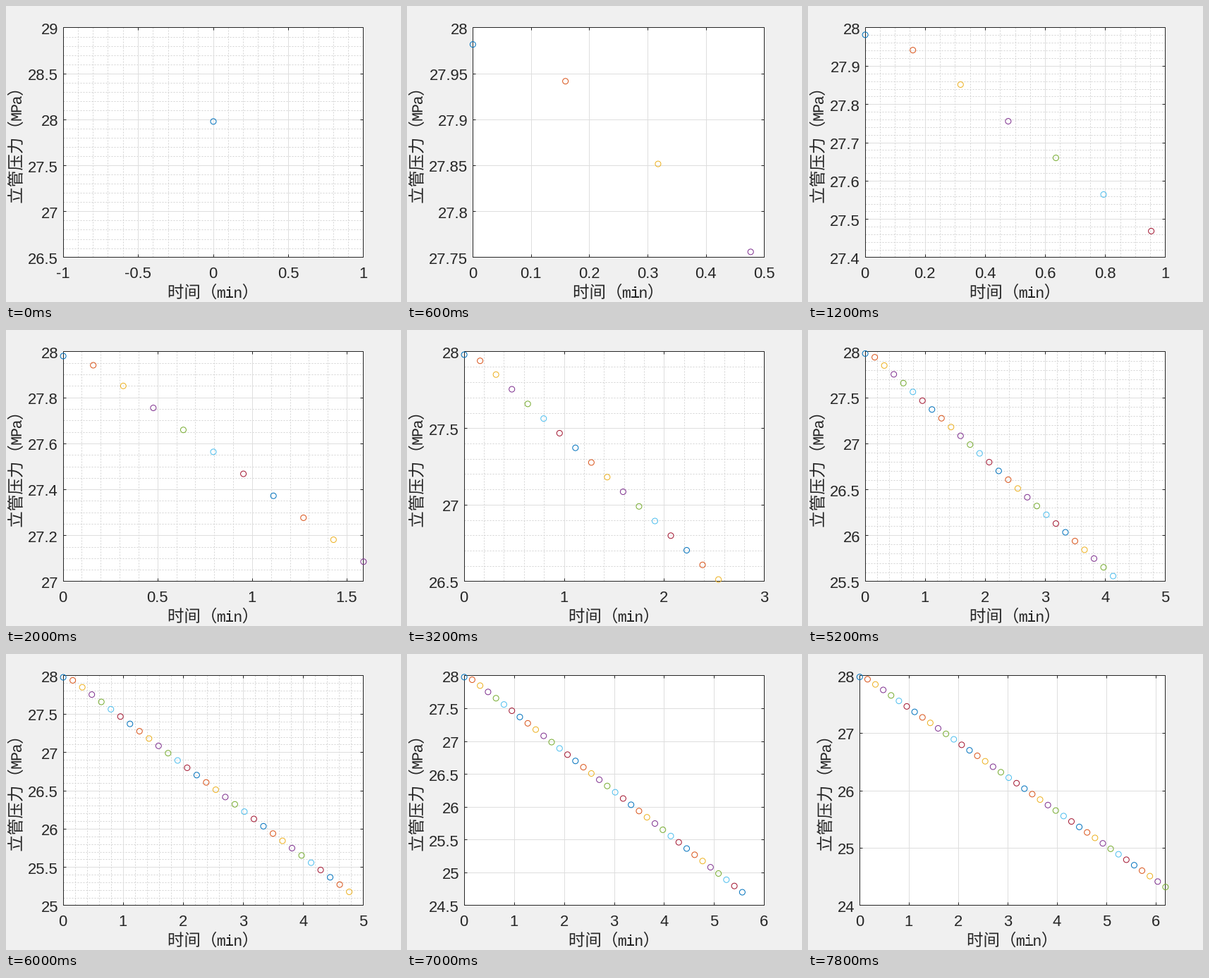
Write a matplotlib script that moves like this. It is 560 px wide and 420 px high and loops after 8000 ms.

```python
import math

import matplotlib.pyplot as plt
import numpy as np
from matplotlib.animation import FuncAnimation
from matplotlib.patches import PathPatch, Rectangle
from matplotlib.textpath import TextPath
from matplotlib.transforms import Affine2D

W, H, DPI = 560, 420, 100
FRAMES, INTERVAL = 40, 200
PT = 72 / DPI                      # one pixel in points
RIGHT, TOP, BOTTOM = 506.4, 30.6, 356.6
TICK_PX, LABEL_PX = 22, 23.5
INK = "#262626"
CYCLE = ["#0072bd", "#d95319", "#edb120", "#7e2f8e",
         "#77ac30", "#4dbeee", "#a2142f"]
STEPS = [m * 10.0 ** e for e in range(-3, 2) for m in (1, 2, 5)]
EPS = 1e-7

# pressure falls almost linearly after a slow start
idx = np.arange(FRAMES)
times = idx * 10 / 63
pressure = 27.852 - 0.0957 * (idx - 2) + 1e-5 * (idx - 2) ** 2
pressure[:2] = 27.982, 27.942

fig = plt.figure(figsize=(W / DPI, H / DPI), dpi=DPI, facecolor="#f0f0f0")
ax = fig.add_axes([0, 0, 1, 1])


def multiples(lo, hi, step):
    first, last = math.ceil(lo / step - EPS), math.floor(hi / step + EPS)
    return [k * step for k in range(first, last + 1)]


def auto_axis(values, size, gap):
    """Limits and step: tick aligned, or tight when too much room is lost."""
    lo, hi = min(values), max(values)
    if lo == hi:
        lo, hi = lo - 1, hi + 1
    for step in STEPS:
        a = math.floor(lo / step + EPS) * step
        b = math.ceil(hi / step - EPS) * step
        if (b - a) / step * gap(step) <= size:
            break
    if 1 - (hi - lo) / (b - a) <= 0.2001:
        return a, b, step
    step = next(s for s in STEPS if (hi - lo) / s * gap(s) <= size)
    return lo, hi, step


def minor_values(lo, hi, step):
    mantissa = round(step / 10 ** math.floor(math.log10(step) + EPS))
    small = step / (4 if mantissa == 2 else 5)
    return [v for v in multiples(lo, hi, small)
            if abs(v / step - round(v / step)) > 0.01]


def fmt(v):
    return f"{round(v, 6) + 0.0:.8g}"


def text_width(s):
    return TICK_PX * sum(0.278 if c == "." else 0.556 for c in s)


def line(x, y, **kw):
    ax.plot(x, y, lw=PT, solid_capstyle="butt", dash_capstyle="butt", **kw)


def tick_text(x, y, s, ha):
    ax.text(x, y, s, ha=ha, va="baseline", color=INK,
            family="Liberation Sans", fontsize=TICK_PX * PT)


def axis_label(x, y, name, unit, angle=0):
    """Full-width characters around a half-width unit, centred on (x, y)."""
    em, mono = LABEL_PX, LABEL_PX * 0.93
    pos = -(len(name) + 2 + len(unit) / 2) * em / 2
    for c in f"{name}（{unit}）":
        narrow = c.isascii()
        family = "Liberation Mono" if narrow else "Noto Sans CJK JP"
        advance = em / 2 if narrow else em
        shift = (advance - 0.6 * mono) / 2 if narrow else 0
        glyph = TextPath((pos + shift, 0), c, size=mono if narrow else em,
                         prop={"family": family})
        place = Affine2D().rotate_deg(angle).scale(1, -1).translate(x, y)
        ax.add_patch(PathPatch(glyph.transformed(place), fc=INK, lw=0))
        pos += advance


def draw(i):
    ax.clear()
    ax.set_axis_off()
    ax.set_xlim(0, W)
    ax.set_ylim(H, 0)

    xs, ys = times[:i + 1], pressure[:i + 1]
    y0, y1, ystep = auto_axis(ys, BOTTOM - TOP, lambda s: 46)
    yticks = multiples(y0, y1, ystep)
    room = max(text_width(fmt(v)) for v in yticks)
    left = max(72.8, 37.8 + room)
    x0, x1, xstep = auto_axis(xs, RIGHT - left,
                              lambda s: 65 if s > 0.99 else 72)
    xticks = multiples(x0, x1, xstep)

    # the frame sits on whole pixels
    fl, fr = round(left), round(RIGHT)
    ft, fb = math.floor(TOP), math.floor(BOTTOM)

    def px(v):
        return left + (v - x0) / (x1 - x0) * (RIGHT - left)

    def py(v):
        return BOTTOM - (v - y0) / (y1 - y0) * (BOTTOM - TOP)

    ax.add_patch(Rectangle((fl, ft), fr - fl, fb - ft,
                           fc="white", ec="none", zorder=0))

    # the minor grid is toggled at every step
    if i % 2 == 0:
        dots = dict(color="#d4d4d4", ls=(0, (2, 2)), zorder=1)
        for v in minor_values(x0, x1, xstep):
            line([px(v)] * 2, [fb, ft], **dots)
        for v in minor_values(y0, y1, ystep):
            line([fl, fr], [py(v)] * 2, **dots)

    tick = 4.3
    for v in xticks:
        x = px(v)
        tick_text(x, 386.5, fmt(v), "center")
        if left + 1 < x < RIGHT - 1:
            line([x, x], [fb, ft], color="#dedede", zorder=2)
            line([x, x], [fb, fb - tick], color=INK, zorder=3)
            line([x, x], [ft, ft + tick], color=INK, zorder=3)
    for v in yticks:
        y = py(v)
        tick_text(left - 6.5, y + 9.3, fmt(v), "right")
        if TOP + 1 < y < BOTTOM - 1:
            line([fl, fr], [y, y], color="#dedede", zorder=2)
            line([fl, fl + tick], [y, y], color=INK, zorder=3)
            line([fr, fr - tick], [y, y], color=INK, zorder=3)

    line([fl, fr, fr, fl, fl], [fb, fb, ft, ft, fb], color=INK, zorder=4)
    ax.scatter(px(xs) + 0.5, py(ys) + 0.5, s=(8 * PT) ** 2,
               facecolors="none", linewidths=PT, zorder=5,
               edgecolors=[CYCLE[k % 7] for k in range(i + 1)])

    axis_label((left + RIGHT) / 2, 414, "时间", "min")
    axis_label(left - room - 16, (TOP + BOTTOM) / 2 - 1, "立管压力", "MPa", 90)
    return []


anim = FuncAnimation(fig, draw, frames=FRAMES, interval=INTERVAL,
                     init_func=lambda: [], repeat=True, repeat_delay=0)
plt.show()
```
